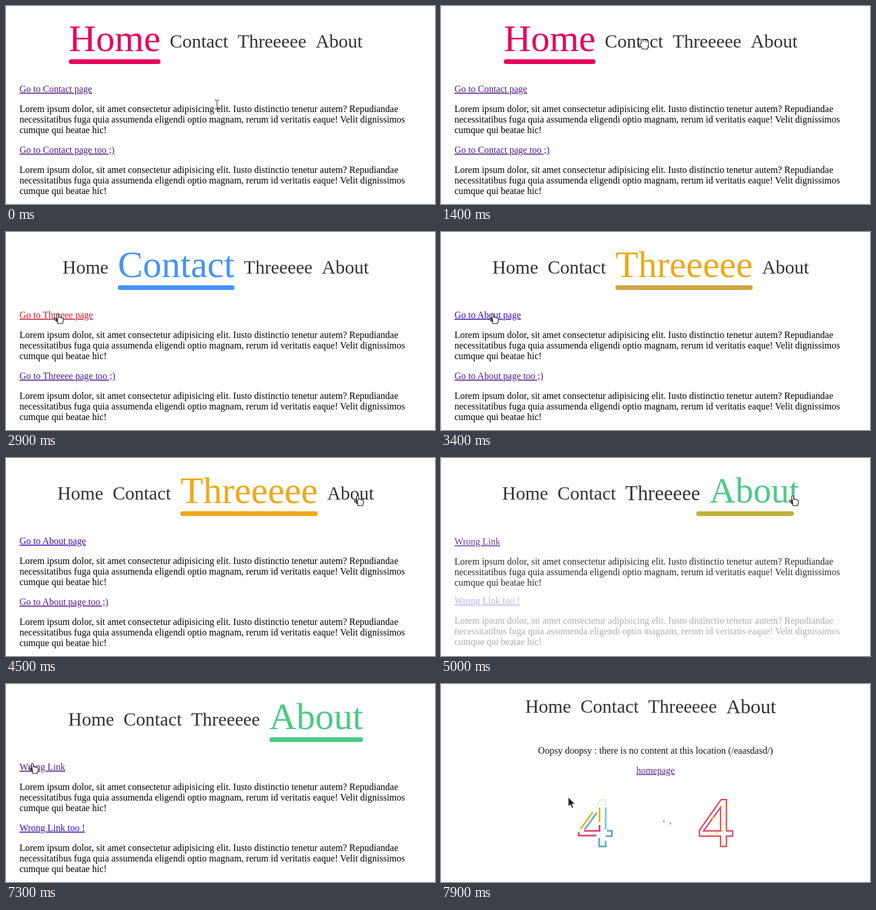
An HTML page for the animation above (8 s loop, 732 by 338 pixels).

```html
<!DOCTYPE html>
<html lang="en">
<head>
<meta charset="utf-8">
<title>Animated navigation</title>
<style>
  html, body { margin: 0; width: 100%; height: 100%; overflow: hidden; background: #fff; }
  svg { display: block; }
  text { font-family: "Liberation Serif", "Times New Roman", serif; font-size: 16px; fill: #000; }
  .link { text-decoration: underline; fill: #551a8b; }
  .mid { text-anchor: middle; }
</style>
</head>
<body>
<svg id="stage" width="732" height="338" viewBox="0 0 732 338">
  <g id="nav"></g>
  <rect id="bar" y="91" height="8" rx="4"/>
  <g id="page"></g>
  <g id="lost">
    <text class="mid" x="366" y="118">Oopsy doopsy : there is no content at this location (/eaasdasd/)</text>
    <text class="mid link" x="366" y="152">homepage</text>
    <g id="dashes" fill="none" stroke-width="3"></g>
    <path fill="none" stroke="#d83a60" stroke-width="2.4"
      d="M478 196.5H487V250H497.5V259H487V276.5H477V259H441V249ZM477 210V250H448Z"/>
    <g id="dots" fill="#f7ec3c"></g>
    <path d="M379 235l1.5-4 1 4z" fill="#a04850"/>
    <path d="M390 236h2.500l-1 4.500z" fill="#667"/>
  </g>
  <g id="cursor" stroke-linejoin="round">
    <path id="beam" fill="none" stroke="#222" d="M-3.500-7.500H-1L0-6.500 1-7.500H3.500M0-6.500V6.500M-3.500 7.500H-1L0 6.500 1 7.500H3.500"/>
    <path id="arrow" fill="#222" stroke="#fff" d="M0 0V16.500L3.800 13 6.500 19 9.200 17.800 6.600 12H11.700Z"/>
    <path id="hand" fill="#fff" stroke="#222" stroke-width="1.200"
      d="M-1.500 11V1.500Q0-1 1.600 1.500V6.500Q3 5 4.500 7 6 6 7.200 7.700 9.500 7 9.800 9V13Q9 15 8.500 17.500H.5Q-1-1 -1 14L-5.500 10Q-6.500 7.500-4 8Z"/>
    <g id="fist">
      <path fill="#fff" stroke="#222" stroke-width="1.200"
        d="M-3.500 7V2Q-2-1 0 1 2-1 3.500 1 5-.5 6.500 1.500 9 1 9 4V10Q8 13 7.500 16.500H-1.500Q-2 13-5.500 11V8Z"/>
      <path d="M0 1V5M3.500 1V5M6.500 2V5" stroke="#222"/>
    </g>
  </g>
</svg>
<script>
const LOOP = 8000, STEP = 100, CENTER = 357.8, GAP = 16;
const SMALL = 32, BIG = 64;
const INK = [51, 51, 51];
const VISITED = '#551a8b', BLUISH = '#3a0cb4', PRESSED = '#c8152d';
const LOREM = [
  'Lorem ipsum dolor, sit amet consectetur adipisicing elit. Iusto distinctio tenetur autem? Repudiandae',
  'necessitatibus fuga quia assumenda eligendi optio magnam, rerum id veritatis eaque! Velit dignissimos',
  'cumque qui beatae hic!'
];
// em: advance width of the label relative to its font size
const TABS = [
  { label: 'Home', em: 2.444, color: [233, 0, 92], links: ['Go to Contact page', 'Go to Contact page too ;)'] },
  { label: 'Contact', em: 3.111, color: [69, 147, 248], links: ['Go to Threeee page', 'Go to Threeee page too ;)'] },
  { label: 'Threeeee', em: 3.664, color: [240, 168, 24], links: ['Go to About page', 'Go to About page too ;)'] },
  { label: 'About', em: 2.5, color: [76, 203, 133], links: ['Wrong Link', 'Wrong Link too !'] }
];
const LOST = 4;
const VISITS = [
  { at: -2000, tab: 0 }, { at: 1580, tab: 1 }, { at: 2970, tab: 2 },
  { at: 4780, tab: 3 }, { at: 7660, tab: LOST }
];
const PRESSES = [[2900, 2970], [7500, 7660]];
const PATH = [
  [800, 360, 168, 'beam'], [1000, 358, 140, 'arrow'], [1200, 350, 75, 'hand'],
  [1300, 345, 57, 'hand'], [1400, 345, 57, 'fist'], [1600, 345, 57, 'hand'],
  [2000, 345, 57, 'hand'], [2100, 310, 88, 'arrow'], [2500, 95, 141, 'hand'],
  [2600, 88, 139, 'hand'], [3700, 88, 139, 'hand'], [3800, 98, 163, 'beam'],
  [4000, 260, 158, 'arrow'], [4300, 597, 87, 'hand'], [4400, 597, 87, 'hand'],
  [4500, 600, 64, 'hand'], [6000, 600, 64, 'hand'], [6100, 582, 77, 'hand'],
  [6200, 500, 105, 'arrow'], [6600, 64, 165, 'arrow'], [6700, 64, 165, 'arrow'],
  [7000, 47, 135, 'hand'], [7100, 45, 132, 'hand'], [7200, 45, 132, 'hand'],
  [7500, 45, 141, 'hand'], [7600, 45, 141, 'hand'], [7700, 75, 152, 'arrow'],
  [7900, 217, 193, 'arrow']
];
const DASHES = [
  ['#eeeedc', 'M264 211L272 197H281V206'], ['#6ccaca', 'M281 210V248'],
  ['#5aa2c4', 'M283 250H291.500V259H281M270 262V276.500H281V267M245 248L266 219'],
  ['#e8ab28', 'M238 247L259 218M270.500 210V235'],
  ['#dc3c64', 'M270.500 240V250H244M235 252V258H265']
];
const DOTS = [[480, 208], [482, 222], [465, 229], [483, 238], [471, 253], [457, 256], [480, 250], [482, 273]];

const $ = id => document.getElementById(id);
const clamp = v => Math.max(0, Math.min(1, v));
const lerp = (a, b, p) => a + (b - a) * p;
const mix = (a, b, p) => `rgb(${a.map((v, i) => Math.round(lerp(v, b[i], p)))})`;
const easeOut = p => 1 - (1 - p) ** 3;
const easeInOut = p => p * p * (3 - 2 * p);
const easeBack = p => 1 + 2.7 * (p - 1) ** 3 + 1.7 * (p - 1) ** 2;

function add(parent, tag, attrs = {}, content = '') {
  const node = document.createElementNS('http://www.w3.org/2000/svg', tag);
  set(node, attrs);
  node.textContent = content;
  return parent.appendChild(node);
}
function set(node, attrs) {
  for (const key in attrs) node.setAttribute(key, attrs[key]);
}

const labels = TABS.map(tab => add($('nav'), 'text', {}, tab.label));
const sections = [147, 251].map(y => {
  const group = add($('page'), 'g');
  const link = add(group, 'text', { x: 23, y, class: 'link' });
  LOREM.forEach((line, i) => add(group, 'text', { x: 23, y: y + 34 + 18 * i }, line));
  return { group, link };
});
DASHES.forEach(([stroke, d]) => add($('dashes'), 'path', { stroke, d }));
DOTS.forEach(([cx, cy]) => add($('dots'), 'circle', { cx, cy, r: 2 }));

function layout(sizes) {
  const widths = sizes.map((size, i) => size * TABS[i].em);
  let x = CENTER - (widths.reduce((a, b) => a + b) + GAP * 3) / 2;
  return widths.map(width => {
    const box = { x, width };
    x += width + GAP;
    return box;
  });
}
const restingBox = tab => layout(TABS.map((_, i) => i === tab ? BIG : SMALL))[tab];

function drawNav(from, to, age) {
  const p = easeOut(clamp(age / 400));
  const weights = TABS.map((_, i) => lerp(+(i === from), +(i === to), p));
  const sizes = weights.map(w => lerp(SMALL, BIG, w));
  const lift = to === LOST ? -23 * p : 0;
  const tint = clamp(p / 0.85);
  layout(sizes).forEach((box, i) => {
    labels[i].style.fontSize = sizes[i] + 'px';
    labels[i].style.fill = mix(INK, TABS[i].color, lerp(+(i === from), +(i === to), tint));
    set(labels[i], { x: box.x, y: 71 + 6 * weights[i] + lift });
  });
  $('bar').style.display = to === LOST ? 'none' : '';
  if (to === LOST) return;
  const a = restingBox(from), b = restingBox(to);
  set($('bar'), {
    x: lerp(a.x, b.x, p),
    width: lerp(a.width, b.width, p),
    fill: mix(TABS[from].color, TABS[to].color, easeInOut(clamp(age / 600)))
  });
}

function enter(node, age) {
  const p = clamp(age / 290);
  set(node, {
    opacity: clamp(age / 250),
    transform: `translate(0 ${-14 * (1 - easeBack(p))})`
  });
}

function drawPage(tab, age, pressed) {
  const lost = tab === LOST;
  $('lost').style.display = lost ? '' : 'none';
  $('page').style.display = lost ? 'none' : '';
  if (lost) return enter($('lost'), age - 10);
  sections.forEach(({ group, link }, i) => {
    const bluish = (tab === 2 && i === 0) || (tab === 3 && i === 1);
    link.textContent = TABS[tab].links[i];
    link.style.fill = pressed && i === 0 ? PRESSED : bluish ? BLUISH : VISITED;
    enter(group, age - 10 - 130 * i);
  });
}

function drawCursor(t) {
  const next = PATH.findIndex(key => key[0] > t);
  const b = PATH[next < 0 ? PATH.length - 1 : next];
  const a = next < 0 ? b : PATH[Math.max(0, next - 1)];
  const p = a === b ? 0 : (t - a[0]) / (b[0] - a[0]);
  set($('cursor'), { transform: `translate(${lerp(a[1], b[1], p)} ${lerp(a[2], b[2], p)})` });
  for (const shape of $('cursor').children) shape.style.display = shape.id === a[3] ? '' : 'none';
}

function draw(time) {
  const t = Math.floor((time % LOOP) / STEP) * STEP;
  const index = VISITS.filter(visit => visit.at <= t).length - 1;
  const { at, tab } = VISITS[index];
  const from = VISITS[Math.max(0, index - 1)].tab;
  drawNav(from, tab, t - at);
  drawPage(tab, t - at, PRESSES.some(([start, end]) => t >= start && t < end));
  drawCursor(t);
}

const start = performance.now();
function frame() {
  draw(performance.now() - start);
  requestAnimationFrame(frame);
}
frame();
</script>
</body>
</html>
```
